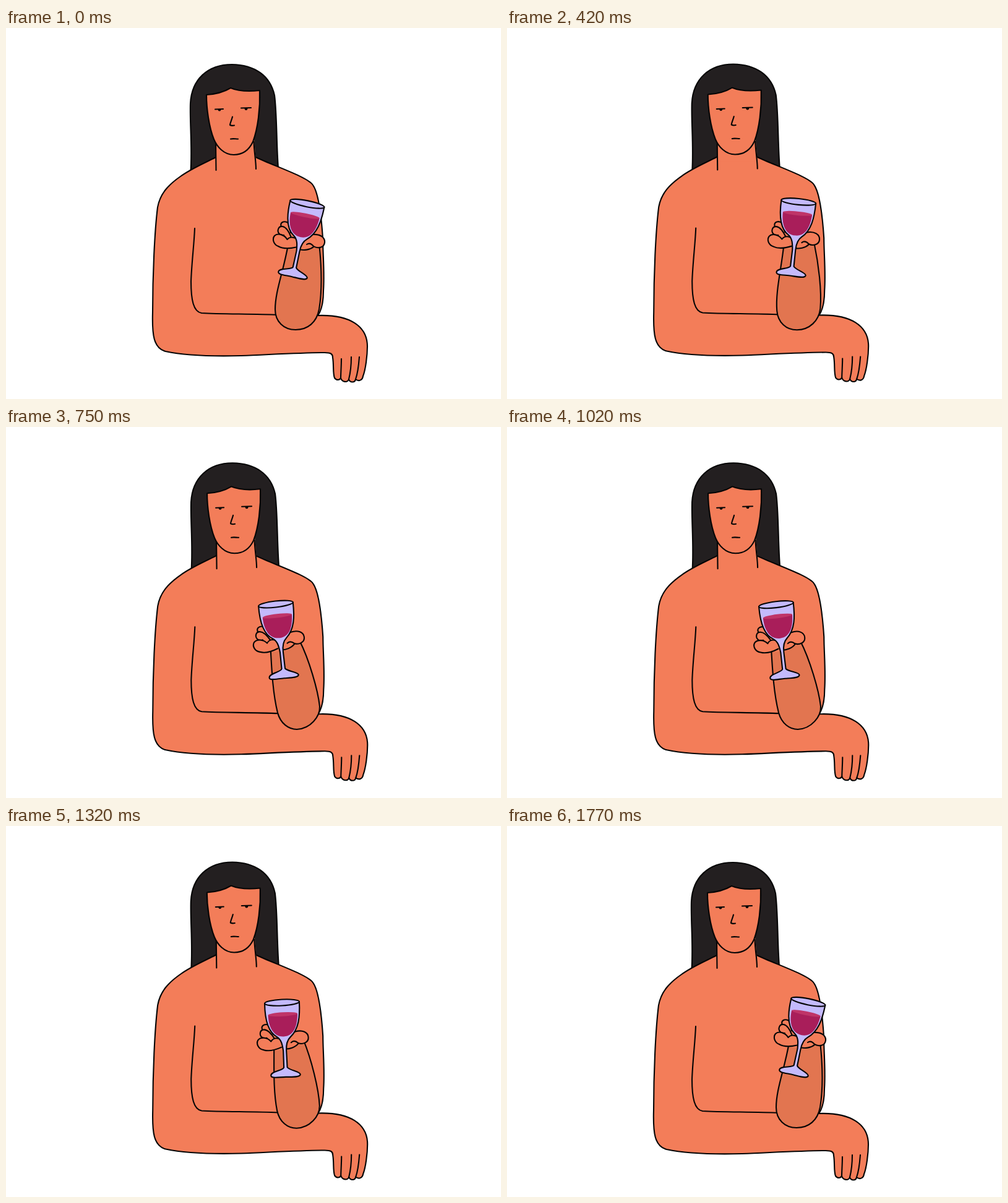
Write an HTML page that moves like this. It is 800 px wide and 600 px high and loops after 1.8 s.

```html
<!DOCTYPE html>
<html lang="en">
<head>
<meta charset="utf-8">
<title>Wine</title>
<style>
  html, body { margin: 0; width: 100%; height: 100%; overflow: hidden; background: #fff; }
  svg { display: block; width: 100vw; height: 100vh; }
  .line { fill: none; }
  .skin { fill: #f37d59; }
  .bare { stroke: none; }
</style>
</head>
<body>
<svg viewBox="0 0 800 600" stroke="#050505" stroke-width="2.1" stroke-linecap="round" stroke-linejoin="round">
  <g id="body">
    <path id="hair" fill="#231f20" d="M298.500 232C301 190 297 155 298 122C300 83 326 59 365 59C402 59.500 427 77 434 109C438 140 437 190 440 226L370 240Z"/>
    <path class="skin" d="M339 209C320 219 300 227 282 240C262 254 249 268 245 290C240 330 237 400 237 460C236 495 238 518 258 523C290 530 340 531 380 530C430 528 480 525 515 525C525 525 528 527 528 533C530 545 528 558 531 566C534 570 539 570 541 566C543 573 552 574 554 568C556 574 564 574 565 568C570 572 576 570 577 563C581 553 584 530 584 515C584 482 555 463 504 465C509 458 513 445 513 425C515 395 512 365 512 340C510 310 506 268 496 254C488 241 430 222 404 209"/>
    <path class="line" d="M542 535C542 545 541 560 541 566M558 532C558 545 556 560 554 568M571 532C570 545 568 560 565 568M305 324C304 350 300 380 299 410C299 440 303 459 316 461C350 463 400 462 440 464"/>
    <g id="head">
      <path class="skin bare" d="M339 180H401L404 216H339Z"/>
      <path class="line" d="M339 187L339.500 230M400.500 184C401 200 404 215 404 228"/>
      <path class="skin" d="M324 108C340 107 353 103 363 97C375 102 392 103 410 101C411 130 407 163 399 184C392 199 380 205 368 205C352 205 341 192 336 180C328 160 324 130 324 108Z"/>
      <path class="line" d="M338 131.500L351 131M380 129.500L396 129M366 143.500C365 148 362 154 362 157C364 158 367 158 369 157.500M363 179.500C367 178.500 371 179.500 375 179.500"/>
      <path class="bare" fill="#050505" d="M342.500 131h5a2.500 3.500 0 0 1-5 0M385.500 129.500h5a2.500 3.500 0 0 1-5 0"/>
    </g>
  </g>
  <path id="arm" fill="#e27550"/>
  <g id="hand">
    <path class="skin bare" d="M452 340L508 342L497 355C483 361 465 360 452 355Z"/>
    <path class="skin" d="M445 322C442 314 449 312 454 314C459 316 459 323 460 331"/>
    <path class="skin" d="M461 339C458 331 453 322 447 321C440 320 438 328 441 332C443 335 446 335 449 335"/>
    <path class="skin" d="M469 354.500C458 357 447 357 440 353C432 350 430 341 434 336C439 331 450 334 454.500 342C457 339 462 337 468 340"/>
    <path class="line" d="M474 358C481 360 491 359 497 354"/>
    <path class="skin" d="M477 350C480 344 488 336 496 334C508 333 516 339 515 347C514 356 503 357 497 353C493 348 489 348 486 350"/>
  </g>
  <g id="glass">
    <path fill="#c4bafc" d="M-28 -116C-29 -92 -26 -70 -11 -61C-4 -56 -3 -48 -2 -38L-2.500 -11C-4 -6 -24 -6 -24 1C-24 6 -12 4 0 4.500C10 5 23 6.500 23.500 1.500C23.500 -3 6 -6 3 -11L3 -38C3 -48 5 -55 11 -60C25 -72 28 -92 28 -116Z"/>
    <path class="bare" fill="#a91e5a" d="M-23.500 -97C-24 -80 -18 -61 0 -61C17 -61 23 -78 24 -97Z"/>
    <ellipse class="bare" fill="#bf3468" cx=".2" cy="-97" rx="23.700" ry="3.200"/>
    <ellipse fill="#c4bafc" cy="-116" rx="28" ry="5"/>
  </g>
</svg>
<script>
const LOOP = 1800;
const ARM_RIGHT = [456,350, 449,392, 435,425, 435,455, 435,475, 449,488, 468,488, 488,488, 502,476, 506,455, 511,425, 510,385, 506,348];
const ARM_LEFT = [427,358, 429,392, 431,430, 439,462, 444,480, 457,489, 470,489, 492,488, 508,468, 507,452, 504,425, 489,375, 474,346];

const [body, hair, head, arm, hand, glass] = ["body", "hair", "head", "arm", "hand", "glass"].map(id => document.getElementById(id));
const mix = (a, b, p) => a + (b - a) * p;
const place = (el, value) => el.setAttribute("transform", value);

// Late-leaning smoothstep between two steps of the loop
function ease(step, from, to) {
  const u = Math.min(1, Math.max(0, (step - from) / (to - from))) ** 1.3;
  return u * u * (3 - 2 * u);
}

// 48 drawings per loop; the first of every four is held twice as long
function stepAt(t) {
  const rest = t % 150;
  return 4 * Math.floor(t / 150) + (rest < 60 ? 0 : Math.floor((rest - 30) / 30));
}

function draw(now) {
  const step = stepAt(now % LOOP);
  const p = ease(step, 2.25, 21.25) - ease(step, 27, 47.3);
  const sway = Math.sin(Math.PI * step / 47);
  const lift = step < 21 ? -3 * Math.sin(Math.PI * step / 21) : 0;

  place(body, `translate(${0.3 * sway} ${-0.7 * sway})`);
  place(head, `translate(${0.8 * sway} 0)`);
  place(hair, `translate(${0.8 * sway} 0)`);

  const points = ARM_RIGHT.map((v, i) => mix(v, ARM_LEFT[i], p));
  arm.setAttribute("d", `M${points.slice(0, 2)}C${points.slice(2)}`);
  place(hand, `translate(${mix(473.5, 440, p)} ${mix(343, 346.5, p) + lift}) rotate(${-14.4 * p}) translate(-473.5 -343)`);
  place(glass, `translate(${mix(464, 449, p)} ${mix(398, 402.3, p) + lift}) rotate(${mix(11.4, -7, p)})`);
  requestAnimationFrame(draw);
}
draw(0);
</script>
</body>
</html>
```
